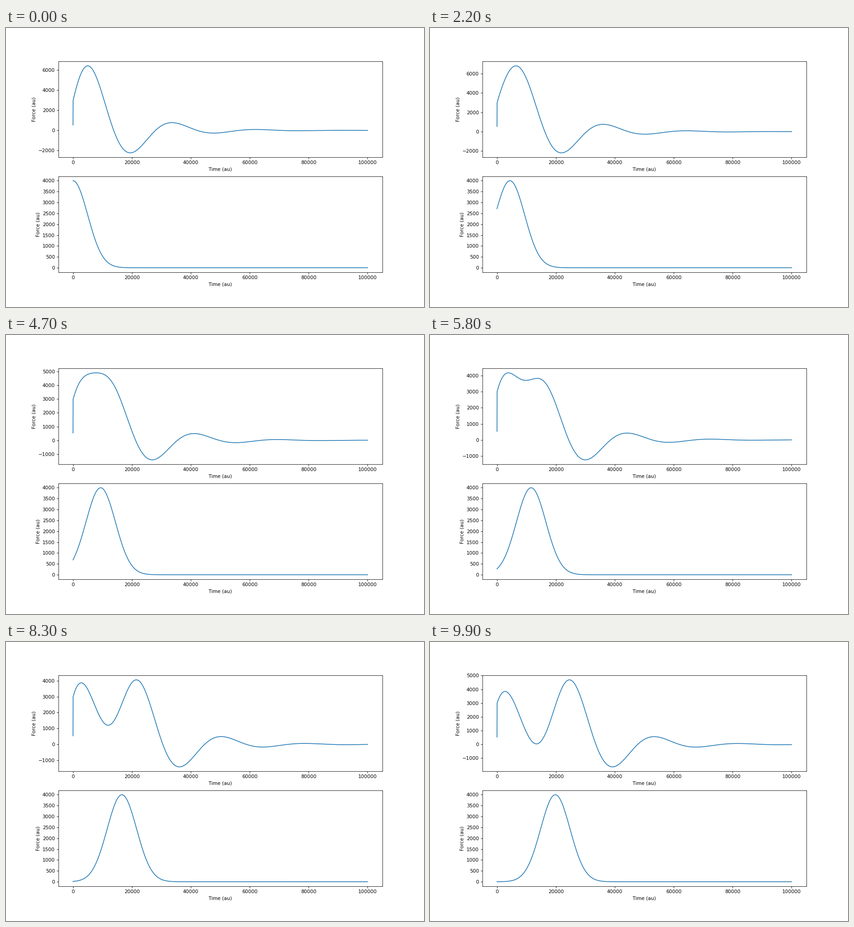
A matplotlib script that plays this animation: 916 px wide and 611 px high, repeating every 10 s.

```python
import numpy as np
import matplotlib.pyplot as plt
from matplotlib.animation import FuncAnimation

FRAMES, INTERVAL = 100, 100
DPI = 76.35

# Damped oscillator that follows a Gaussian pulse
DAMPING = 1.5e-4
STIFFNESS = 1e-4 / 1822.89
START, DRIFT = 3000.0, 1.102
FIRST = 535.0
HEIGHT, SIGMA = 4000.0, 5000.0

dt = 50.0
t = np.arange(0, 100000 + dt, dt)
centers = 200.0 * np.arange(FRAMES)


def pulse(time, center):
    return HEIGHT * np.exp(-(time - center) ** 2 / (2 * SIGMA ** 2))


def slope(time, state):
    x, drift = state
    gap = pulse(time, centers) - x
    return np.array([DAMPING * gap + drift, STIFFNESS * gap])


def solve():
    """Integrate the response to every pulse centre at once (RK4)."""
    state = np.array([np.full(FRAMES, START), np.full(FRAMES, DRIFT)])
    out = np.full((len(t), FRAMES), FIRST)
    for i in range(1, len(t)):
        now = t[i]
        out[i] = state[0]
        k1 = slope(now, state)
        k2 = slope(now + dt / 2, state + dt / 2 * k1)
        k3 = slope(now + dt / 2, state + dt / 2 * k2)
        k4 = slope(now + dt, state + dt * k3)
        state = state + dt / 6 * (k1 + 2 * k2 + 2 * k3 + k4)
    return out.T


response = solve()

plt.rcParams["font.family"] = "DejaVu Sans"
fig, axes = plt.subplots(2, 1, figsize=(916.01 / DPI, 611.01 / DPI), dpi=DPI,
                         facecolor="white")
fig.subplots_adjust(left=0.125, right=0.9003, bottom=0.125, top=0.88,
                    hspace=0.2)

lines = []
for ax in axes:
    ax.set_xlabel("Time (au)")
    ax.set_ylabel("Force (au)")
    lines += ax.plot(t, np.zeros_like(t), color="#1f77b4", lw=1.5)


def update(k):
    for ax, line, y in zip(axes, lines, (response[k], pulse(t, centers[k]))):
        line.set_ydata(y)
        ax.relim()
        ax.autoscale_view()
    return lines


anim = FuncAnimation(fig, update, frames=FRAMES, interval=INTERVAL,
                     init_func=lambda: update(0), repeat=True, repeat_delay=0)
plt.show()
```
